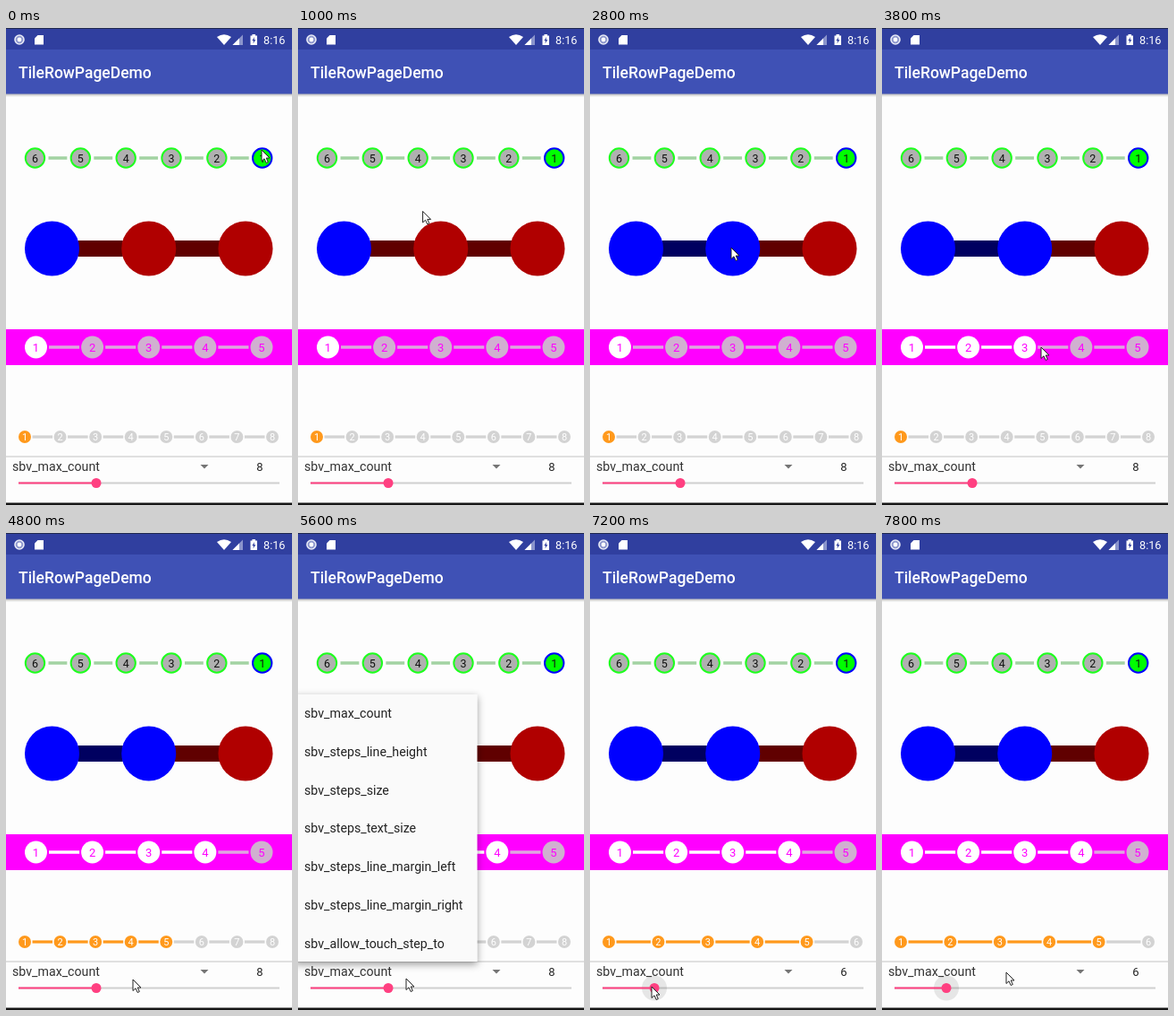
Recreate the animation shown at these times as an HTML page. Size 320 px wide and 532 px high, loop 8000 ms.

```html
<!DOCTYPE html>
<html lang="en">
<head>
<meta charset="utf-8">
<title>Step bars</title>
<style>
  html, body { margin: 0; width: 100%; height: 100%; overflow: hidden; background: #fdfdfd; }
  svg { display: block; width: 320px; height: 532px; font-family: Roboto, sans-serif; }
</style>
</head>
<body>
<svg id="stage" viewBox="0 0 320 532">
  <defs>
    <linearGradient id="barShadow" x2="0" y2="1">
      <stop stop-color="#000" stop-opacity=".3"/><stop offset="1" stop-color="#000" stop-opacity="0"/>
    </linearGradient>
    <filter id="lift" x="-10%" y="-10%" width="120%" height="120%">
      <feDropShadow dx="0" dy="3" stdDeviation="4" flood-opacity=".4"/>
    </filter>
  </defs>
  <rect width="320" height="532" fill="#fdfdfd"/>
  <rect y="73" width="320" height="4" fill="url(#barShadow)"/>
  <rect y="24" width="320" height="49.5" fill="#3f51b5"/>
  <rect width="320" height="24" fill="#303f9f"/>
  <rect width="320" height="1" fill="#20284f"/>
  <g fill="#fff">
    <circle cx="15" cy="13" r="5" fill="#8b95cc" stroke="#e8eaf6" stroke-width="1.6"/>
    <circle cx="15" cy="13" r="2.4"/>
    <path d="M35.5 8H42V18.5H32V11.5Z"/>
    <path d="M236 10Q244 4.500 252 10L244 19Z"/>
    <path d="M265 7.500V19H253.500Z" fill="#8b95cc"/>
    <path d="M261 11.500V19H253.500Z"/>
    <path d="M273.500 8.500H275.500V7H279V8.500H281V19H273.500Z"/>
    <path d="M278 10L275.300 14.300H277L276.500 17.500L279.300 13H277.600Z" fill="#303f9f"/>
    <text x="288" y="17.700" font-size="12.700">8:16</text>
    <text x="14" y="56" font-size="17.500" font-weight="500">TileRowPageDemo</text>
  </g>
  <rect y="336" width="320" height="40" fill="#f0f"/>
  <g id="scene"></g>
  <rect y="529.500" width="320" height="2.500" fill="#151515"/>
</svg>
<script>
const LOOP = 8000, TICK = 200;
const scene = document.getElementById('scene');

// Pointer path: time, x, y of the tip
const pointerPath = [
  [0, 286, 136], [400, 286, 136], [1400, 42, 250], [2000, 38, 255], [2400, 80, 250],
  [2800, 158, 245], [3000, 158, 252], [3400, 158, 354], [3800, 178, 356], [4000, 220, 354],
  [4400, 180, 454], [4800, 142, 498], [5000, 143, 488], [5600, 121, 497], [6000, 101, 504],
  [6400, 98, 506], [6600, 98, 506], [7200, 69, 506], [7400, 70, 506], [7800, 139, 490]
];

const options = ['max_count', 'steps_line_height', 'steps_size', 'steps_text_size',
  'steps_line_margin_left', 'steps_line_margin_right', 'allow_touch_step_to'];

function pointerAt(t) {
  const i = pointerPath.findIndex(p => p[0] > t);
  if (i < 0) return pointerPath.at(-1).slice(1);
  const [a, b] = [pointerPath[i - 1], pointerPath[i]];
  const k = (t - a[0]) / (b[0] - a[0]);
  return [a[1] + (b[1] - a[1]) * k, a[2] + (b[2] - a[2]) * k];
}

const label = (x, y, size, text, fill = '#222', extra = '') =>
  `<text x="${x}" y="${y}" font-size="${size}" fill="${fill}" ${extra}>${text}</text>`;
const disc = (x, y, r, fill, extra = '') =>
  `<circle cx="${x}" cy="${y}" r="${r}" fill="${fill}" ${extra}/>`;
const box = (x, y, w, h, fill, extra = '') =>
  `<rect x="${x}" y="${y}" width="${w}" height="${h}" fill="${fill}" ${extra}/>`;

// Colours come as [pending, reached]; gap is the distance from a centre to its lines.
function stepBar({ left, right, y, r, gap, line, count, done, fills, lines, strokes, text, size, reversed }) {
  const pitch = (right - left) / (count - 1);
  let out = '';
  for (let i = 1; i < count; i++) {
    const x = reversed ? right - i * pitch : left + (i - 1) * pitch;
    out += box(x + gap, y - line / 2, pitch - 2 * gap, line, lines[+(i < done)]);
  }
  for (let i = 1; i <= count; i++) {
    const x = reversed ? right - (i - 1) * pitch : left + (i - 1) * pitch;
    const on = +(i <= done);
    out += disc(x, y, r, fills[on], strokes ? `stroke="${strokes[on]}" stroke-width="2"` : '');
    if (text) out += label(x, y + size * 0.36, size, i, text, 'text-anchor="middle"');
  }
  return out;
}

function slider(t, count) {
  const x = 14 + (count - 2) * 14.5;
  const ripple = t >= 6600 ? disc(x, 507.5, 14, '#000', 'fill-opacity=".09"') : '';
  return box(14, 506.5, 292, 2, '#d0d0d0') + ripple + box(14, 506.5, x - 14, 2, '#ff4081')
    + disc(x, 507.5, 5.5, t === 6400 ? '#e0386f' : '#ff4081');
}

function popup(t) {
  if (t < 5200 || t > 6000) return '';
  const items = options.map((name, i) => label(7, 206 + i * 42.75, 14.2, 'sbv_' + name)).join('');
  return `<g opacity="${t === 5200 ? 0.7 : 1}">${box(-4, 180, 204.5, 298, '#fafafa', 'filter="url(#lift)"')}${items}</g>`;
}

function draw(t) {
  const count = t < 6800 ? 8 : t < 7000 ? 7 : 6;
  const [px, py] = pointerAt(t);
  scene.innerHTML =
    stepBar({ left: 32.5, right: 286.7, y: 145, r: 10.7, gap: 15, line: 3.5, count: 6, done: 1, reversed: true,
      fills: ['#b0b0b0', '#0f0'], lines: ['#a3d3a3', '#0f0'], strokes: ['#1eff1e', '#00f'], text: '#111', size: 12.5 })
    + stepBar({ left: 51.5, right: 268, y: 246, r: 30.5, gap: 29, line: 18, count: 3, done: t < 2800 ? 1 : 2,
      fills: ['#b00000', '#00f'], lines: ['#600000', '#000060'] })
    + stepBar({ left: 33.5, right: 286, y: 356, r: 12.5, gap: 14.5, line: 3.5, count: 5,
      done: t < 3400 ? 1 : t < 4000 ? 3 : 4,
      fills: ['#d0b0d0', '#fff'], lines: ['#dfa6df', '#fff'], text: '#f0f', size: 13 })
    + stepBar({ left: 21, right: 298, y: 456, r: 7, gap: 8.5, line: 3.2, count, done: t < 4400 ? 1 : 5,
      fills: ['#d3d3d3', '#ff991c'], lines: ['#d3d3d3', '#ff991c'], text: '#fff', size: 11 })
    + box(0, 477.5, 320, 1, '#c4c4c4')
    + label(7, 494, 14.2, 'sbv_max_count', '#333')
    + '<path d="M217.5 487H226.500L222 491.500Z" fill="#757575"/>'
    + label(284, 494, 13, count, '#222', 'text-anchor="middle"')
    + slider(t, count) + popup(t)
    + `<path transform="translate(${px} ${py})" d="M0 0V12.500L3 9.800L5.200 14.500L7.300 13.500L5.200 9H9Z"
        fill="#fff" stroke="#222" stroke-width="1"/>`;
}

let shown = -1;
function frame(now) {
  const t = Math.floor(now % LOOP / TICK) * TICK;
  if (t !== shown) draw(shown = t);
  requestAnimationFrame(frame);
}
draw(0);
requestAnimationFrame(frame);
</script>
</body>
</html>
```
